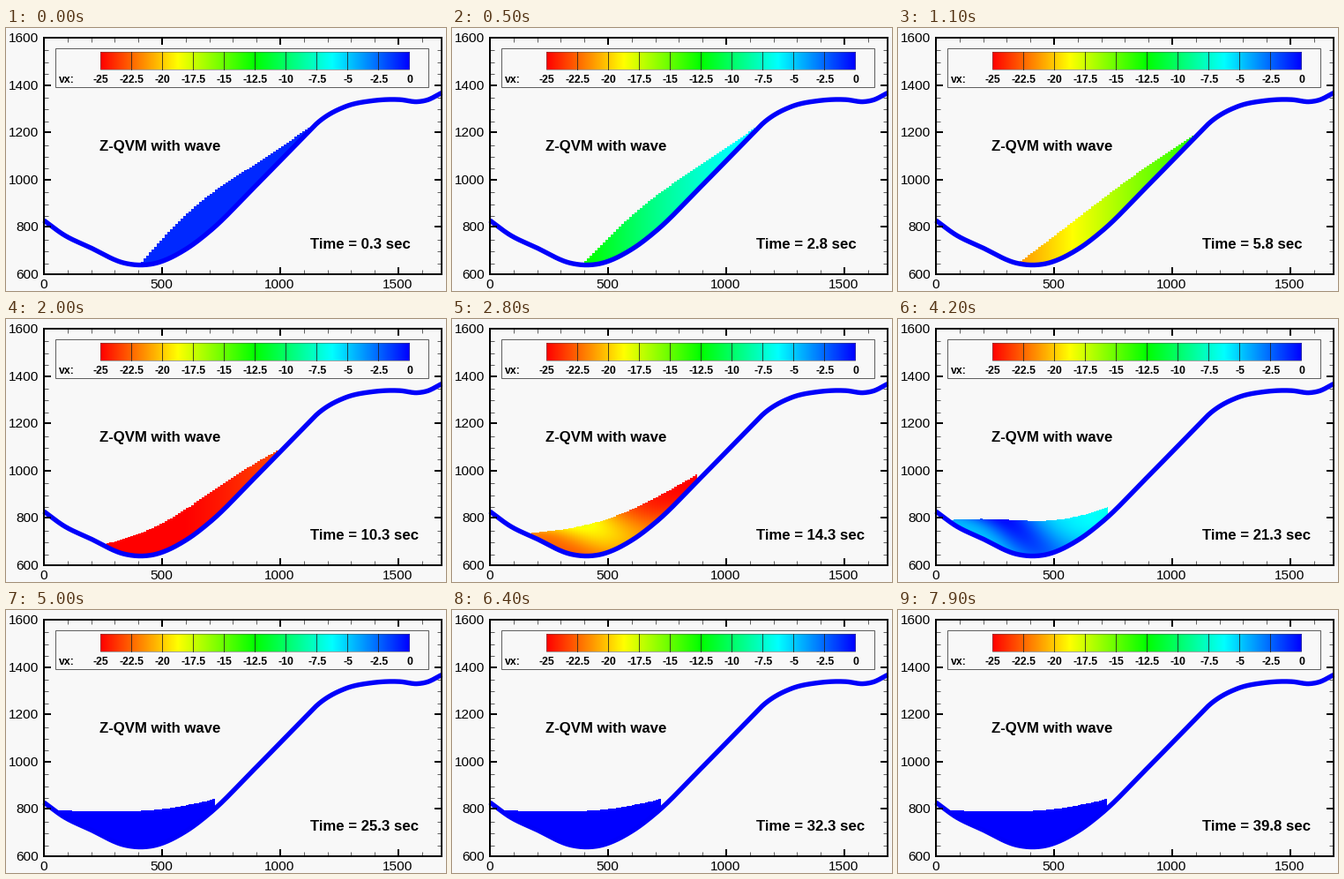
These frames come from a looping animation (499 px wide and 298 px high, 8000 ms). A matplotlib script:

```python
import numpy as np
import matplotlib.pyplot as plt
from matplotlib.animation import FuncAnimation
from matplotlib.patches import Rectangle

W, H, FRAMES = 499, 298, 80
PT = 0.72  # points per pixel at 100 dpi
LEFT, RIGHT, TOP, BOTTOM = 43, 494, 11, 279
SCALE = 0.268
SETTLED = 45  # step at which the slide comes to rest
BLUE = "#0000fa"
BACK = "#f8f8f8"

BED = np.array([
    (43, 218), (65, 234), (95, 248.5), (135, 266.5), (150, 268.5), (165, 267.5),
    (205, 250), (232, 229.5), (280, 182), (335, 126), (355, 106), (385, 89),
    (415, 82.5), (447, 81.2), (467, 83.5), (478, 81.5), (494, 73.5)])
BED_SLOPES = np.gradient(BED[:, 1], BED[:, 0])


def ease(s):
    s = np.clip(s, 0, 1)
    return s * s * (3 - 2 * s)


def bed_height(x):
    """Smooth curve through the bed points."""
    xs, ys = BED.T
    i = np.clip(np.searchsorted(xs, x, side="right") - 1, 0, len(xs) - 2)
    h = xs[i + 1] - xs[i]
    s = (x - xs[i]) / h
    return (ys[i] + (ys[i + 1] - ys[i]) * ease(s)
            + s * (1 - s) * h * ((1 - s) * BED_SLOPES[i] - s * BED_SLOPES[i + 1]))


def rainbow(v):
    """Red at -25 through yellow, green and cyan to blue at 0."""
    k = np.clip((v + 25) / 25, 0, 1) * 4
    return np.stack([np.clip(2 - k, 0, 1), np.clip(np.minimum(k, 4 - k), 0, 1),
                     np.clip(k - 2, 0, 1)], axis=-1)


cols = np.arange(W) + .5
rows = np.arange(H)[:, None] + .5
bed = bed_height(np.clip(cols, LEFT, RIGHT))


def edges(i):
    s = min(i / (SETTLED - 1), 1)
    return 153 - 95 * ease(s), 345 - 108 * ease(s ** 1.2)


def surface(i, u, left, right):
    """A chord between the edges, bent by two sine waves."""
    start = bed_height(left) - 2
    end = bed_height(right) - 4 - 7 * ease((i - 18) / 18)
    bulge = 13 - 28 * ease(i / 28) + 8 * ease((i - 28) / 18)
    skew = 4 * np.cos(2 * np.pi * min(i, 46) / 38)
    return (start + (end - start) * u
            - bulge * np.sin(np.pi * u) - skew * np.sin(2 * np.pi * u))


def velocity(i, u, depth):
    """The front speeds up and stops first; later the middle surface slows."""
    s = min(i / SETTLED, 1)
    if s == 1:
        return np.zeros_like(u + depth)
    speed = (1 - s) + 25 * np.sin(np.pi * s ** (.84 + .42 * np.clip(u, 0, 1)))
    distance = (u - .35 - .25 * depth) / .22
    drag = 5 * ease((i - 20) / 8) * (1 - .3 * depth) * np.exp(-distance ** 2)
    return -(speed - drag)


def slide_image(i):
    left, right = edges(i)
    u = (cols - left) / (right - left)
    blocks = np.floor(cols / 3) * 3 + 1.5  # stepped particle edge
    top = surface(i, np.clip((blocks - left) / (right - left), 0, 1), left, right)
    depth = np.clip((rows - top) / np.maximum(bed - top, 1), 0, 1)
    inside = (rows >= top) & (rows <= bed) & (u >= 0) & (u <= 1)
    return np.dstack([rainbow(velocity(i, u, depth)), inside.astype(float)])


plt.rcParams["font.family"] = "Liberation Sans"
fig = plt.figure(figsize=(W / 100, H / 100), dpi=100, facecolor=BACK)
ax = fig.add_axes([0, 0, 1, 1])
ax.set_axis_off()


def line(x, y, width=1, color="black", z=4, **kw):
    return ax.plot(x, y, color=color, lw=width * PT, zorder=z, **kw)[0]


def label(x, y, text, size, **kw):
    return ax.text(x, y, text, fontsize=size * PT, zorder=6, **kw)


def box(x, y, w, h, width, z, color="black", fill="none"):
    ax.add_patch(Rectangle((x, y), w, h, fc=fill, ec=color, lw=width * PT, zorder=z))


def ticks(position, major, vertical):
    """A pair of inward ticks on opposite sides of the axes."""
    size, width, color = (8, 2, "black") if major else (5, 1, "#606060")
    at = [position + (0 if major else .5)] * 2
    low, high = (TOP, BOTTOM) if vertical else (LEFT, RIGHT)
    for span in ([low, low + size], [high - size, high]):
        x, y = (at, span) if vertical else (span, at)
        line(x, y, width, color, solid_capstyle="butt")


slide = ax.imshow(slide_image(0), extent=(0, W, H, 0), interpolation="nearest",
                  aspect="auto", zorder=1)
bed_x = np.linspace(LEFT, RIGHT, 400)
line(bed_x, bed_height(bed_x), 5.4, BLUE, 2, solid_capstyle="butt")

box(LEFT, TOP, RIGHT - LEFT, BOTTOM - TOP, 2, 5)
for value in range(0, 1700, 100):
    x = round(LEFT + value * SCALE)
    ticks(x, value % 500 == 0, True)
    if value % 500 == 0:
        label(x - .5, 295, str(value), 15.4, ha="center", va="baseline")
for value in range(600, 1601, 50):
    y = round(BOTTOM - (value - 600) * SCALE)
    ticks(y, value % 200 == 0, False)
    if value % 200 == 0:
        label(37, y + 5, str(value), 15.4, ha="right", va="baseline")

# Colour legend
box(56.5, 22.5, 423, 44, 1, 4, "#606060", BACK)
ax.imshow(rainbow(np.linspace(-25, 0, 351))[None], extent=(107, 458, 47, 27),
          aspect="auto", interpolation="nearest", zorder=5)
box(107.5, 26.5, 350, 20, .5, 6, "#505050")
label(60, 62, "vx:", 12.3, weight="bold")
for n in range(11):
    x = 107 + n * 35.1
    if 0 < n < 10:
        line([int(x) + .5] * 2, [27, 47], .8, "#202020", 6)
    label(x, 62.5, f"{-25 + 2.5 * n:g}", 12.3, weight="bold", ha="center")

label(106, 139, "Z-QVM with wave", 16.7, weight="bold")
clock = label(345, 250, "", 16.8, weight="bold")
ax.set_xlim(0, W)
ax.set_ylim(H, 0)


def update(i):
    slide.set_data(slide_image(i))
    clock.set_text(f"Time = {0.3 + 0.5 * i:.1f} sec")
    return slide, clock


anim = FuncAnimation(fig, update, frames=FRAMES, interval=100, repeat=True,
                     repeat_delay=0, blit=False)
plt.show()
```
